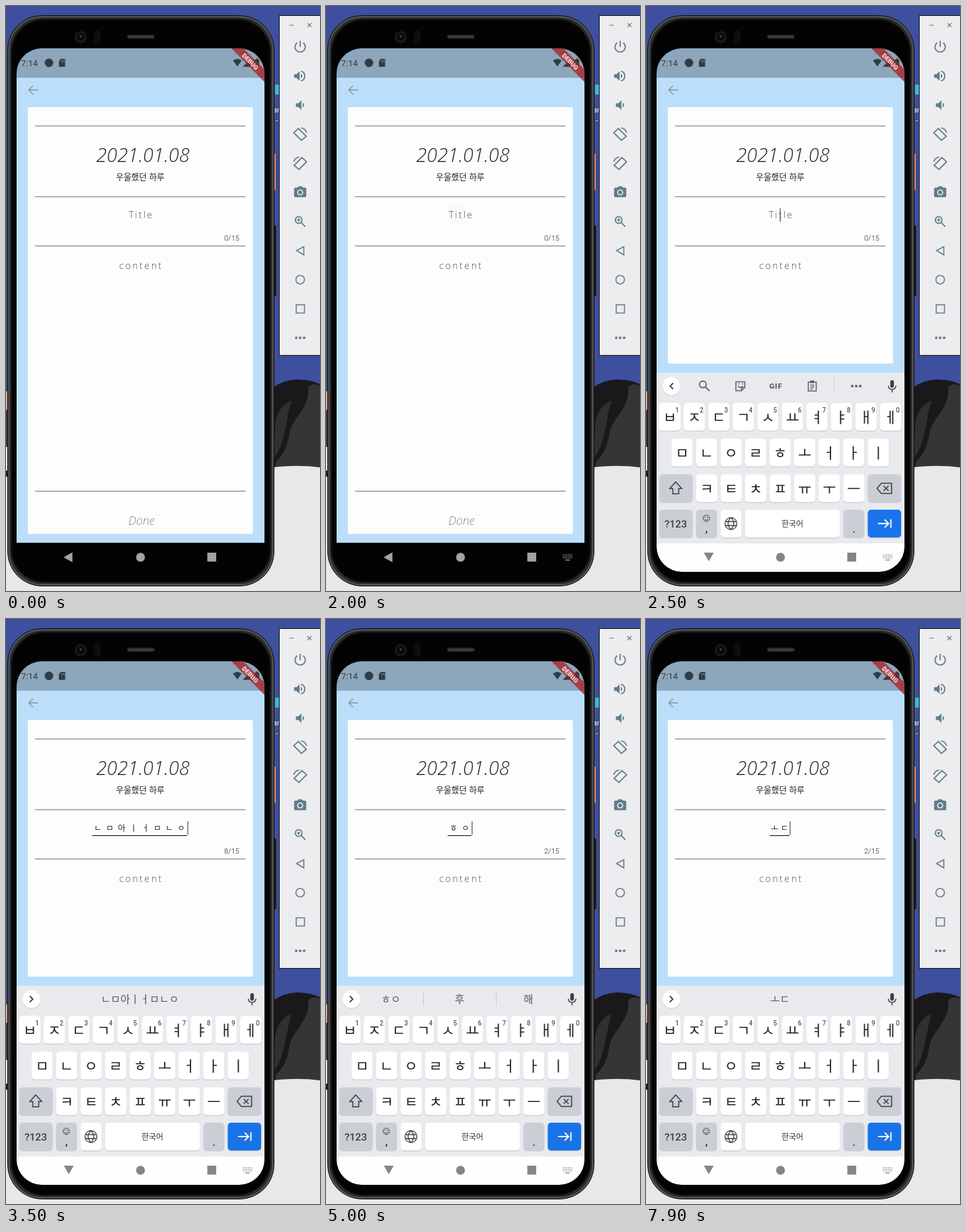
Write an HTML page that moves like this. It is 475 px wide and 885 px high and loops after 8000 ms.

```html
<!DOCTYPE html>
<html lang="ko">
<head>
<meta charset="utf-8">
<style>
  html, body { margin: 0; width: 475px; height: 885px; overflow: hidden; }
  svg { display: block; font-family: Roboto, sans-serif; }
  text.mid { text-anchor: middle; }
  .hand { font-family: "Open Sans", "Noto Sans CJK KR", sans-serif; font-weight: 300; }
  .ko { font-family: "Noto Sans CJK KR", "Noto Sans CJK", sans-serif; }
  .line { fill: none; stroke: currentColor; stroke-width: 1.6; }
</style>
</head>
<body>
<svg id="stage" width="475" height="885" viewBox="0 0 475 885"></svg>
<script>
const LOOP = 8000;

const rect = (x, y, w, h, fill, r = 0) =>
  `<rect x="${x}" y="${y}" width="${w}" height="${h}" rx="${r}" fill="${fill}"/>`;
const circle = (x, y, r, fill) => `<circle cx="${x}" cy="${y}" r="${r}" fill="${fill}"/>`;
const path = (d, fill) => `<path d="${d}" fill="${fill}"/>`;
const line = (d, color, width = 1.6) => `<path class="line" d="${d}" style="color:${color};stroke-width:${width}"/>`;
const text = (x, y, size, fill, str, cls = "mid", extra = "") =>
  `<text x="${x}" y="${y}" font-size="${size}" fill="${fill}" class="${cls}" ${extra}>${str}</text>`;
// 24-unit icon centred on x, y
const icon = (x, y, scale, body) =>
  `<g transform="translate(${x} ${y}) scale(${scale}) translate(-12 -12)">${body}</g>`;
const dots = (x, y, color) => [-6, 0, 6].map(d => circle(x + d, y, 2, color)).join("");

function wallpaper() {
  return rect(0, 0, 475, 885, "#3d4f9d") +
    path("M400 580Q420 565 440 565Q460 565 475 572V705H400Z", "#19191b") +
    path("M475 574Q462 570 457 577C461 608 432 622 428 650Q425 674 408 690V698H475Z", "#353538") +
    path("M432 597Q411 606 407 632L405 682C421 672 424 620 432 597Z", "#303033") +
    path("M395 699Q440 693 475 698V885H395Z", "#e8e8ea") +
    rect(0, 583, 5, 28, "#e5a397") + rect(0, 611, 5, 56, "#4b3a3c") +
    rect(0, 667, 5, 36, "#e8e8ea") + rect(0, 703, 5, 9, "#222") +
    rect(0, 712, 400, 173, "#e8e8ea") +
    rect(407, 119, 6, 15, "#3cb6d6") +
    text(404, 161, 11, "#fff", "ar", "") + text(408, 177, 11, "#fff", "-", "") +
    rect(402, 223, 6, 56, "#e88a75", 2);
}

function phoneBody() {
  return rect(402, 332, 7, 107, "#1c1c1e", 2) +
    `<rect x="2.5" y="14.5" width="403" height="863" rx="52" fill="#3b3c3c" stroke="#0b0b0b"/>` +
    `<rect x="4.5" y="16.5" width="399" height="859" rx="50" fill="#2a2b2b" stroke="#565858" stroke-width="2"/>` +
    `<rect x="8.5" y="20.5" width="391" height="851" rx="50" fill="#030303" stroke="#101010" stroke-width="2"/>` +
    circle(113, 47, 9.5, "#151516") + circle(113, 47, 5, "#050506") + circle(113, 46, 2, "#3a3a3c") +
    rect(133, 37, 10, 20, "#0d0d0e", 4) +
    rect(183, 43.5, 42, 6, "#2b2b2c", 3) + line("M186 46.5H222", "#444", 2);
}

function statusBar() {
  const ink = "#303c46";
  return rect(16, 64, 375, 44.5, "#8ca6bb") +
    text(23, 91, 13, ink, "7:14", "") + circle(65, 86, 6.5, ink) +
    path("M83 80H89.5V92H80V83.5Z", ink) + line("M84 82V85M86 82V85M88 82V85", "#8ca6bb", .8) +
    path("M343.500 82.500Q350 77.500 356.500 82.500L350 91.500Z", ink) +
    path("M370 80V92H358Z", ink) + rect(376, 81, 7, 11, ink, 1) + rect(378, 79.500, 3, 2, ink) +
    path("M341 64H359L391 96V115Z", "rgba(172,24,30,.72)") +
    text(0, 3.5, 9.5, "#f3e4e4", "DEBUG", "mid",
      `font-weight="800" transform="translate(369.500 84) rotate(45)"`);
}

function page() {
  const rules = [181.5, 288.5, 363, 734].map(y => line(`M44 ${y}H362.500`, "#969696", 1.5)).join("");
  return rect(16, 108, 375, 705, "#bbdefb") + statusBar() +
    line("M48.500 127H35M41 120.500L34.500 127L41 133.500", "#8f959a") +
    rect(33, 153, 340.5, 645.5, "#fdfdfd", 2) + rules +
    text(207, 236, 29, "#222", "2021.01.08", "mid hand", `font-style="italic"`) +
    text(203, 263, 12.7, "#222", "우울했던 하루", "mid ko") +
    text(204.5, 398, 14, "#505050", "content", "mid hand", `letter-spacing="2.6"`) +
    text(205, 784.5, 18, "#888", "Done", "mid hand", `font-style="italic"`);
}

function emulatorBar() {
  const c = "#607d8b";
  const at = (y, body, scale = .92) => icon(445, y, scale, body);
  const stroke = d => line(d, c, 2);
  const speaker = x => path(`M${x} 9v6h4l5 5V4l-5 5z`, c);
  const rotate = stroke("M9 2.500L22 15.500L14 22L1.500 9.500ZM13.500 1.500Q20.500 2.500 22.500 9.500");
  return `<rect x="413.5" y="14.5" width="70" height="514" fill="#ededef" stroke="#111"/>` +
    line("M428.500 29H435.500M456 26L462 32M462 26L456 32", "#777", 1.2) +
    at(62, stroke("M12 2V12M7 5A8.500 8.500 0 1 0 17 5")) +
    at(106, speaker(2) + path("M13 8Q18 12 13 16Z", c) + stroke("M13.500 4A8.300 8.300 0 0 1 13.500 20")) +
    at(150, speaker(5) + path("M16 8Q21 12 16 16Z", c)) +
    at(194, rotate) + at(238, `<g transform="matrix(-1 0 0 1 24 0)">${rotate}</g>`) +
    at(282, path("M9 2L7.200 4H4Q2 4 2 6V18Q2 20 4 20H20Q22 20 22 18V6Q22 4 20 4H16.800L15 2Z", c) +
      circle(12, 12, 5, "#ededef") + circle(12, 12, 3.2, c)) +
    at(326, stroke("M15 9.500A5.500 5.500 0 1 1 4 9.500A5.500 5.500 0 1 1 15 9.500M14 14L20.500 20.500M9.500 7V12M7 9.500H12")) +
    line("M450.500 364V376.500L439.500 370Z", c) + line("M451.500 414A6.500 6.500 0 1 1 438.500 414A6.500 6.500 0 1 1 451.500 414", c) +
    line("M439 452H451.500V464.500H439Z", c) + dots(445, 502, c);
}

function navBar(light, down, ime) {
  const c = light ? "#858585" : "#a3a3a3";
  let keys = "";
  for (let i = 0; i < 18; i++) keys += rect(358.5 + i % 6 * 2.5, 829.5 + (i / 6 | 0) * 2.5, 1.3, 1.3, c);
  return rect(16, 812, 375, 45, light ? "#fefefe" : "#030303") +
    path(down ? "M87.500 827H102.500L95 840Z" : "M100.500 826.500V841.500L87 834Z", c) +
    circle(203.5, 834, 6.7, c) + rect(304.5, 827, 13.5, 13.5, c) +
    (ime ? keys + rect(362, 837.5, 7, 1.3, c) : "");
}

function key(x, y, w, label = "", fill = "#fff") {
  return rect(x, y + 1.2, w, 42, "#c9ccd0", 5) + rect(x, y, w, 42, fill, 5) +
    text(x + w / 2, y + 29.7, 22, "#1f1f1f", label, "mid ko");
}

function keyRow(chars, x, y) {
  return [...chars].map((ch, i) => key(x + i * 37.1, y, 32, ch)).join("");
}

function keyboard(settled) {
  const grey = "#cbced5", ink = "#3c4043";
  const digits = [..."1234567890"].map((d, i) => text(47 + i * 37.1, 614.5, 10, "#555", d, "mid", `font-weight="500"`)).join("");
  return rect(16, 555, 375, 262, "#e8eaed") +
    keyRow("ㅂㅈㄷㄱㅅㅛㅕㅑㅐㅔ", 20, 600.5) + digits +
    keyRow("ㅁㄴㅇㄹㅎㅗㅓㅏㅣ", 38.5, 654.5) + keyRow("ㅋㅌㅊㅍㅠㅜㅡ", 75.8, 708.5) +
    key(20, 708.5, 50.5, "", grey) + key(335.5, 708.5, 50.5, "", grey) +
    line("M45 720L54 730H49.500V738H40.500V730H36Z", ink) +
    line("M356 722H371.500V737.500H356L349.500 729.800ZM359.500 726L367 733.500M367 726L359.500 733.500", ink) +
    key(20, 762, 50.5, "", grey) + text(45, 789, 15.5, ink, "?123", "mid", `font-weight="500"`) +
    key(75.8, 762, 31.5, "", grey) + line("M96 775A4.800 4.800 0 1 1 86.400 775A4.800 4.800 0 1 1 96 775M88.500 776.500Q91.200 779.500 94 776.500", ink, 1) +
    circle(89.5, 773.5, .8, ink) + circle(93, 773.5, .8, ink) + text(91.5, 796, 18, "#222", ",") +
    key(113, 762, 31.5) + line("M137.500 783A9 9 0 1 1 119.500 783A9 9 0 1 1 137.500 783M128.500 774Q120 783 128.500 792Q137 783 128.500 774M120.500 780H136.500M120.500 786H136.500", ink, 1.3) +
    key(150, 762, 143.5) + text(221.5, 787.5, 12, "#333", "한국어", "mid ko") +
    key(298.7, 762, 31.5, "", grey) + text(314.5, 797, 18, "#222", ".") +
    key(335.5, 762, 50.5, "", "#1a73e8") +
    line(settled ? "M351 783H366M361 777L367 783L361 789M370.500 776.500V789.500" : "M353.500 788L358.500 793L368.500 783", "#fff", 1.9);
}

function tools() {
  const c = "#5f6368";
  return line("M91 572.500A5 5 0 1 1 81 572.500A5 5 0 1 1 91 572.500M90 576.500L96 582.500", c, 1.8) +
    line("M136 568.500H149.500V577L144.500 582H136ZM149.500 577H144.500V582M139 575Q142.500 579 146 575M139 571.500H141M145 571.500H147", c) +
    text(196.5, 579, 11.5, c, "GIF", "mid", `font-weight="900" letter-spacing=".8"`) +
    line("M245.500 569H257.500V582.500H245.500ZM248.500 573.500H254.500M248.500 576.500H254.500M248.500 579.500H252.500", c) +
    rect(248.5, 566.5, 6, 4, c) + rect(284, 564, 1, 21, "#cfd1d4") + dots(318, 575, c);
}

function suggestionBar(bar) {
  const ink = "#3c4043";
  const words = Array.isArray(bar) ? bar : [];
  const centres = words.length > 1 ? [98, 202, 306] : [202.5];
  const content = bar === "tools" ? tools()
    : bar === "contact" ? text(202, 580, 14.3, "#1a73e8", "Tap to enable contact suggestions.")
    : words.map((w, i) => text(centres[i], 580.5, 16, "#555a60", w, "mid ko")).join("") +
      (words.length > 1 ? rect(147, 564, 1, 21, "#c6c8cb") + rect(257, 564, 1, 21, "#c6c8cb") : "");
  return circle(38.5, 576, 14, "#d6d8db") + circle(38.5, 575, 13.5, "#fff") +
    line(bar === "tools" ? "M41 570.500L36.500 575L41 579.500" : "M36 570.500L40.500 575L36 579.500", ink, 1.8) + content +
    rect(369.5, 566, 5.5, 11.5, ink, 2.7) + line("M366.500 574.500Q367 580 372.300 580Q377.500 580 378 574.500M372.300 580V584.500", ink);
}

function titleField(value, cursor) {
  const chars = [...value];
  const widths = chars.map(ch => "ㅗㄷ".includes(ch) ? 15 : 18);
  const total = widths.reduce((a, b) => a + b, 0);
  let x = 202 - total / 2;
  const centres = widths.map(w => (x += w) - w / 2);
  const body = value
    ? text(centres.join(" "), 320.5, 12.5, "#222", value, "mid ko", `font-weight="500"`) + rect(202 - total / 2, 327, total, 1.2, "#222")
    : text(204.5, 320.5, 14, "#505050", "Title", "mid hand", `letter-spacing="2.3"`);
  return body + (cursor ? rect(202.3 + total / 2, 306, 1.4, 20.5, "#666") : "") +
    text(353, 355, 11, "#666", chars.length + "/15", "", `text-anchor="end"`);
}

// [start, value, suggestion bar, cursor]
const long = "ㄴㅁ아ㅣㅓㅁㄴㅇ";
const four = [long.slice(0, 4), "남아", "남아있는"];
const steps = [
  [0, "", null, 0], [1700, "", null, 1], [2000, "", null, 0],
  [2200, "", "contact", 1], [2500, "", "tools", 1],
  [3000, long.slice(0, 2), "tools", 1], [3100, long.slice(0, 4), four, 1],
  [3300, long.slice(0, 5), four, 1], [3400, long.slice(0, 7), [long.slice(0, 6)], 1],
  [3500, long, [long], 1],
  [3900, long.slice(0, 7), [long], 1], [4000, long.slice(0, 6), [long.slice(0, 6)], 1],
  [4300, long.slice(0, 5), [long.slice(0, 5)], 1], [4400, long.slice(0, 4), four, 1],
  [4500, long.slice(0, 2), ["ㄴㅁ", "너무", "나만"], 1], [4600, "ㄴ", ["ㄴ", "나", "너"], 1],
  [4700, "", "tools", 1],
  [4900, "ㅎ", "tools", 1], [5000, "ㅎㅇ", ["ㅎㅇ", "후", "해"], 1],
  [5400, "ㅎ", ["ㅎ", "하", "해"], 1], [5600, "", ["ㅎ", "하", "해"], 1], [5700, "", "tools", 1],
  [6000, "", "tools", 0], [6500, "", "tools", 1],
  [7000, "ㅗ", "tools", 1], [7100, "ㅗ", ["ㅗ", "오", "호"], 1], [7200, "ㅗㄷ", ["ㅗㄷ"], 1],
  [7500, "ㅗ", ["ㅗㄷ"], 1], [7600, "ㅗ", ["ㅗ", "오", "호"], 1],
  [7800, "ㅗㄷ", ["ㅗ", "오", "호"], 1], [7900, "ㅗㄷ", ["ㅗㄷ"], 1]
];

function ripple(t) {
  if (t < 1000 || t >= 2500) return "";
  const grow = Math.min(4, Math.floor((t - 1000) / 100) + 1) / 4;
  return circle(196.5, 313.5, 5 + 10 * grow, t < 1300 ? "#f3f3f3" : "#fafafa");
}

function screen(t) {
  const [, value, bar, cursor] = steps.findLast(s => s[0] <= t);
  const open = t >= 2200, settled = t >= 2300;
  return ripple(t) + titleField(value, cursor) +
    (settled ? rect(16, 541, 375, 18, "#bbdefb") : "") +
    (open ? `<g transform="translate(0 ${settled ? 0 : 4})">${keyboard(settled)}${suggestionBar(bar)}</g>` : "") +
    `<g clip-path="url(#${open ? (settled ? "nav" : "navLow") : "navFull"})">${navBar(open, settled, t >= 1700)}</g>`;
}

const clip = (id, y) => `<clipPath id="${id}">${rect(16, y, 375, 60, "#000")}</clipPath>`;
document.getElementById("stage").innerHTML =
  `<defs><clipPath id="glass">${rect(16, 64, 375, 792, "#000", 38)}</clipPath>` +
  clip("nav", 813) + clip("navLow", 817) + clip("navFull", 812) + `</defs>` +
  wallpaper() + phoneBody() + emulatorBar() +
  `<g clip-path="url(#glass)">${page()}<g id="live"></g></g>`;

const live = document.getElementById("live");
let shown = "";
function draw(now) {
  // the picture only changes on 100 ms ticks
  const next = screen(Math.floor(now % LOOP / 100) * 100);
  if (next !== shown) live.innerHTML = shown = next;
  requestAnimationFrame(draw);
}
draw(performance.now());
</script>
</body>
</html>
```
